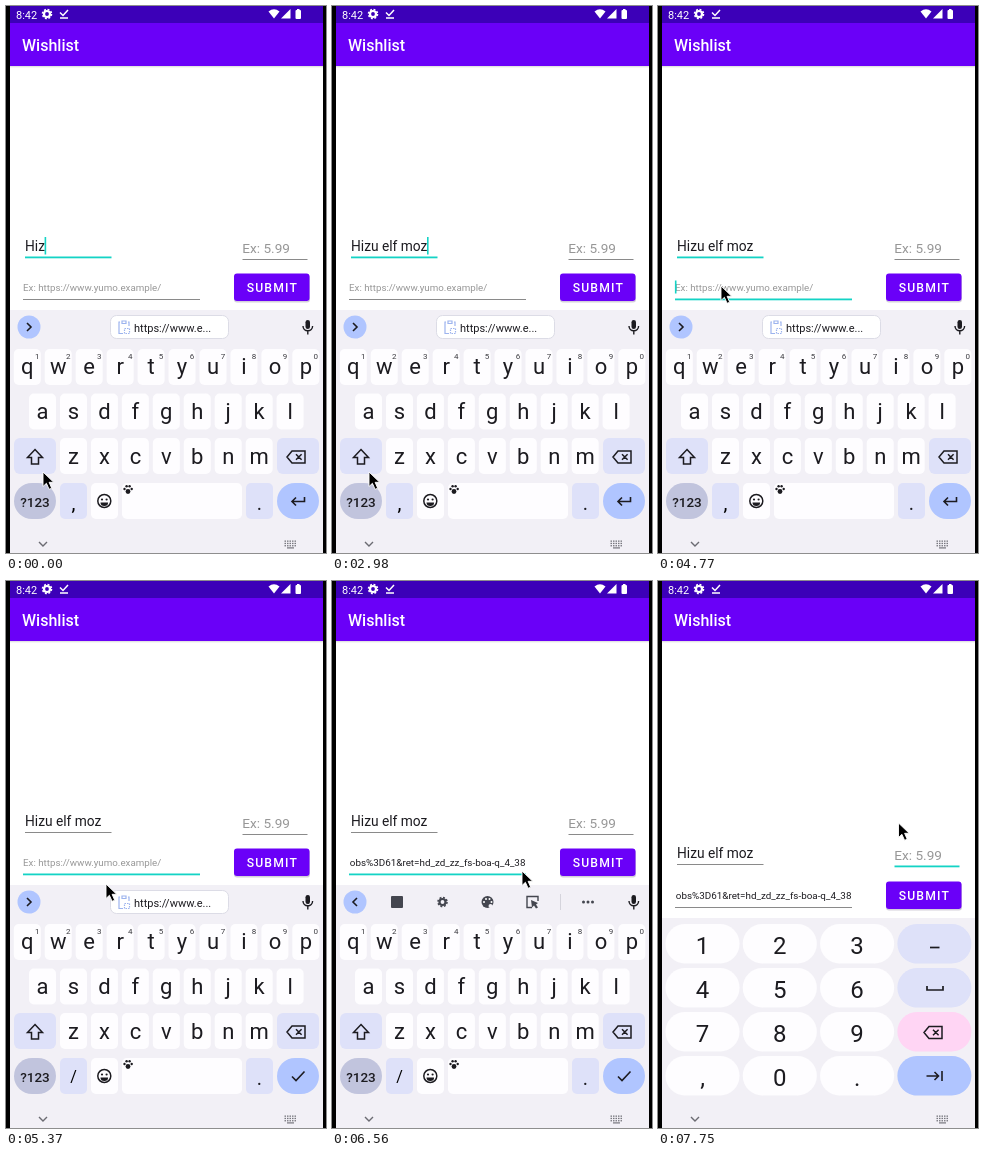
An HTML page for the animation above (8 s loop, 320 by 547 pixels).

```html
<!DOCTYPE html>
<html lang="en">
<head>
<meta charset="utf-8">
<title>Wishlist form</title>
<style>
html, body { margin: 0; width: 100%; height: 100%; overflow: hidden; background: #000; }
svg { display: block; width: 320px; height: 547px; font-family: Roboto, sans-serif; }
text { white-space: pre; }
</style>
</head>
<body>
<svg id="stage" viewBox="0 0 320 547"></svg>
<script>
const PURPLE = '#6a00f8', TEAL = '#14d3c5', INK = '#1c1b20', ICON = '#44464f';
const KEY = '#fefdff', SOFT = '#dee1f9', BLUE = '#b0c5ff';
const ITEM = 'Hizu elf moz', LINK = 'obs%3D61&ret=hd_zd_zz_fs-boa-q_4_38';

const rect = (x, y, w, h, fill, r = 0, more = '') =>
  `<rect x="${x}" y="${y}" width="${w}" height="${h}" rx="${r}" fill="${fill}" ${more}/>`;
const text = (x, y, size, s, fill = INK, more = '') =>
  `<text x="${x}" y="${y}" font-size="${size}" fill="${fill}" ${more}>${s.replace('&', '&amp;')}</text>`;
const mid = (x, y, size, s, fill = INK, more = '') => text(x, y, size, s, fill, 'text-anchor="middle" ' + more);
const line = (d, w = 1.5, color = INK, more = '') =>
  `<path d="${d}" fill="none" stroke="${color}" stroke-width="${w}" ${more}/>`;
const fill = (d, color) => `<path d="${d}" fill="${color}"/>`;
const dot = (x, y, r, color) => `<circle cx="${x}" cy="${y}" r="${r}" fill="${color}"/>`;
const ring = (x, y, r, w, color, more = '') =>
  `<circle cx="${x}" cy="${y}" r="${r}" fill="none" stroke="${color}" stroke-width="${w}" ${more}/>`;
const group = (id, body) => `<g id="${id}">${body}</g>`;
const gear = (x, y, c) => ring(x, y, 3, 2.2, c) + ring(x, y, 4.5, 1.6, c, 'stroke-dasharray="1.9 1.63"');
const erase = (x, y) =>
  line(`M${x - 4} ${y - 6}h13v12h-13l-5-6zM${x} ${y - 2.8}l5.6 5.6m0-5.6l-5.6 5.6`);

function statusBar() {
  const w = '#fff';
  return rect(4, 0, 313, 17, '#3c00b8') + text(10, 12.5, 11, '8:42', w) + gear(41, 8, w) +
    line('M54 6.5l3 3 5-5.5M54 12h8', 1.5, w) +
    fill('M262.5 5.5q5.5-4.5 11 0l-5.500 7z', w) + fill('M275 12.500h9.500v-9.500z', w) +
    rect(289.500, 4, 5.500, 9, w, 1) + rect(291, 3, 2.500, 2, w);
}

function toolbar() {
  const palette = dot(155.5, 321, 6, ICON) + dot(152, 321, 1, '#fff') + dot(154, 318, 1, '#fff') +
    dot(157.500, 318, 1, '#fff') + dot(159.500, 321, 1, '#fff') + dot(158.500, 325, 2, '#f2f0f6');
  return group('chip',
      rect(104.5, 309.5, 118, 23, '#fff', 6, 'stroke="#dcdce6"') +
      line('M114 316h-1v11.500h4M122 316h1v4M116 315h4v2.500h-4z', 1.2, '#9db4ee') +
      line('M118.500 322.500h5v5h-5z', 1.2, '#9db4ee', 'stroke-dasharray="1.5 1"') +
      text(128, 326, 11, 'https://www.e...')) +
    group('tools',
      rect(59, 315, 12, 12, ICON, 1) + gear(110.5, 321, ICON) + palette +
      line('M206 320v-4.500h-11v11h5', 1.4, ICON) + fill('M199 319l7 3-2 1.500 2 3-2 1-2-3-2 2z', ICON) +
      rect(228, 313, 1, 16, '#d5d4dc') + [251.5, 256, 260.5].map(x => dot(x, 321, 1.5, ICON)).join('')) +
    dot(23, 321, 11.5, BLUE) + `<g id="arrow">${line('M21 317l4 4-4 4', 1.6)}</g>` +
    rect(299.5, 314, 4.500, 9, INK, 2.25) + line('M297 320a4.800 4.800 0 0 0 9.600 0M301.800 325v3.500', 1.4);
}

function letters() {
  let s = rect(4, 304, 313, 243, '#f2f0f6') + toolbar();
  const row = (keys, x, top, base) => [...keys].forEach((k, i) => {
    const c = x + i * 30.95;
    s += rect(c - 13.5, top, 27, 36, KEY, 5) + mid(c, base, 22, k);
    if (top < 350) s += mid(c + 10, 353, 8, String((i + 1) % 10), '#3b3b40');
  });
  row('qwertyuiop', 21.3, 343, 368);
  row('asdfghjkl', 36.5, 387.5, 413);
  row('zxcvbnm', 67.5, 432, 458);
  s += rect(8, 432, 42, 36, SOFT, 6) + line('M29 443.500l7.500 8h-4v6.500h-7v-6.500h-4z') +
    rect(271, 432, 42, 36, SOFT, 6) + erase(290, 451);
  s += rect(8, 477, 42, 36, '#c1c4dd', 18) + mid(29, 500.5, 13.5, '?123', INK, 'font-weight="500"') +
    rect(54, 477, 27, 36, SOFT, 5) + '<text id="slash" x="67.500" text-anchor="middle"></text>' +
    rect(85, 477, 27, 36, KEY, 5) + ring(98.3, 495, 6.5, 1.5, INK) +
    dot(96, 493.5, 1.1, INK) + dot(100.6, 493.5, 1.1, INK) + fill('M94.500 496.500h7.600a3.800 3.500 0 0 1-7.600 0z', INK) +
    rect(116, 477, 120, 36, KEY, 5) + dot(122, 485.5, 2.4, INK) +
    [[118.5, 483], [120.6, 480.3], [123.6, 480.3], [125.7, 483]].map(p => dot(...p, 1.2, INK)).join('') +
    rect(240, 477, 27, 36, SOFT, 5) + mid(253.5, 504, 20, '.') +
    rect(271, 477, 42, 36, BLUE, 18) +
    group('enter', line('M298.500 491v4.500h-12.500m4-4l-4 4 4 4', 1.6)) +
    group('check', line('M286 495.500l4 4 8.500-9', 1.6));
  return s;
}

function numberPad() {
  let s = rect(4, 337, 313, 210, '#f2f0f6');
  const tints = [SOFT, SOFT, '#ffd5f4', BLUE];
  ['123', '456', '789', ',0.'].forEach((keys, r) => {
    const y = 343 + r * 44;
    [...keys, ''].forEach((k, c) => {
      const x = 7.5 + c * 77.3;
      s += rect(x, y, 74, 39.5, c < 3 ? KEY : tints[r], 19.5) + mid(x + 37, y + 29.5, 24, k);
    });
  });
  return s + line('M272 366.500h9.500', 1.7) + line('M269 405v4h16v-4', 1.7) + erase(275, 451.5) +
    line('M268.500 495h12m-4-4l4 4-4 4M284 490v10', 1.6);
}

function navBar() {
  let s = line('M33 536l4 4 4-4', 1.4, '#6b6b72');
  for (let i = 0; i < 15; i++) s += rect(278.5 + i % 5 * 2.5, 534.5 + Math.floor(i / 5) * 2.3, 1.5, 1.3, '#77777e');
  return s + rect(281, 541.3, 7, 1.2, '#77777e');
}

const underline = (id, x, w) => `<rect id="${id}" x="${x}" width="${w}"/>`;
document.getElementById('stage').innerHTML =
  rect(4, 0, 313, 547, '#fff') + statusBar() +
  rect(4, 60, 313, 1, '#e3e3e3') + rect(4, 61, 313, 1, '#f5f5f5') +
  rect(4, 17, 313, 43, PURPLE) + text(16, 45, 16, 'Wishlist', '#fff', 'font-weight="500"') +
  group('top',
    text(19, 245, 13.75, '', INK, 'id="name"') + underline('nameLine', 19, 86.5) +
    text(236.3, 246.5, 13.6, 'Ex: 5.99', '#979797') + underline('priceLine', 236.5, 65)) +
  group('low',
    text(17, 284.7, 9.75, 'Ex: https://www.yumo.example/', '#979797', 'id="hint"') +
    text(17.8, 284.7, 9.85, LINK, INK, 'id="link"') + underline('linkLine', 17, 177) +
    rect(228, 269, 76, 27.500, '#d4d0da', 3) + rect(228, 267.5, 75.5, 27.5, PURPLE, 3) +
    text(240.7, 286, 12.2, 'SUBMIT', '#fff', 'font-weight="500" letter-spacing="1.15"')) +
  rect(0, 0, 1.6, 17, TEAL, 0, 'id="caret"') +
  group('letters', letters()) + group('pad', numberPad()) + navBar() +
  group('pointer', '<path d="M0 0v14.500l3.400-3.200 2.700 6 2.600-1.100-2.600-5.900h4.600z" fill="#000" stroke="#fff" stroke-width=".9"/>');

const $ = id => document.getElementById(id);
const show = (id, on) => $(id).style.display = on ? '' : 'none';

const TICK = 149;
// [tick, characters typed]
const typing = [[0, 3], [2, 4], [5, 5], [9, 6], [11, 7], [12, 8], [13, 9], [17, 10], [18, 11], [20, 12]];
// ticks at which the caret turns on or off in turn
const blinks = [0, 4, 6, 16, 17, 23, 26, 29, 32, 35, 38, 43, 46, 52];
// [tick, x, y]
const moves = [[0, 37, 466], [23, 37, 466], [24, 29.5, 471], [25, 31, 454], [27, 45, 368], [29, 61, 290], [30, 63, 280],
  [34, 63, 280], [36, 100, 303], [38, 148, 322], [39, 151, 325], [42, 151, 325], [44, 190, 290], [46, 237, 245], [47, 240.5, 242], [60, 240.5, 242]];

function pointerAt(n) {
  const i = moves.findIndex(m => m[0] > n), [a, x, y] = moves[i - 1], [b, u, v] = moves[i];
  const k = (n - a) / (b - a);
  return [x + (u - x) * k, y + (v - y) * k];
}

function setLine(id, y, active) {
  const el = $(id);
  el.setAttribute('y', active ? y - 0.5 : y);
  el.setAttribute('height', active ? 1.8 : 1);
  el.setAttribute('fill', active ? TEAL : '#8a8a8a');
}

function draw(now) {
  const n = Math.floor((now % 8000 + 8) / TICK);
  const field = n < 32 ? 'name' : n < 48 ? 'link' : 'price';
  const pasted = n >= 39, tools = n >= 41, numeric = n >= 49, url = n >= 33;

  $('name').textContent = ITEM.slice(0, typing.filter(s => s[0] <= n).pop()[1]);
  setLine('nameLine', 251, n < 33);
  setLine('linkLine', 293, field === 'link');
  setLine('priceLine', 253, field === 'price');
  show('hint', !pasted);
  show('link', pasted);

  const drop = numeric ? 32 : 0;
  $('top').setAttribute('transform', `translate(0 ${drop})`);
  $('low').setAttribute('transform', `translate(0 ${numeric ? 33 : 0})`);

  const [x, y, h] = {
    name: [19 + $('name').getComputedTextLength(), 231, 17.5],
    link: [pasted ? 193 : 17.3, 274.5, 13],
    price: [236.6, 232 + drop, 17.5]
  }[field];
  $('caret').setAttribute('x', x - 0.4);
  $('caret').setAttribute('y', y);
  $('caret').setAttribute('height', h);
  show('caret', blinks.filter(b => b <= n).length % 2);

  show('letters', !numeric);
  show('pad', numeric);
  show('chip', !pasted);
  show('tools', tools);
  $('arrow').setAttribute('transform', tools ? 'translate(46 0) scale(-1 1)' : '');
  show('enter', !url);
  show('check', url);
  $('slash').textContent = url ? '/' : ',';
  $('slash').setAttribute('y', url ? 501 : 504);
  $('slash').setAttribute('font-size', url ? 16 : 20);

  $('pointer').setAttribute('transform', `translate(${pointerAt(n)})`);
  requestAnimationFrame(draw);
}
requestAnimationFrame(draw);
</script>
</body>
</html>
```
